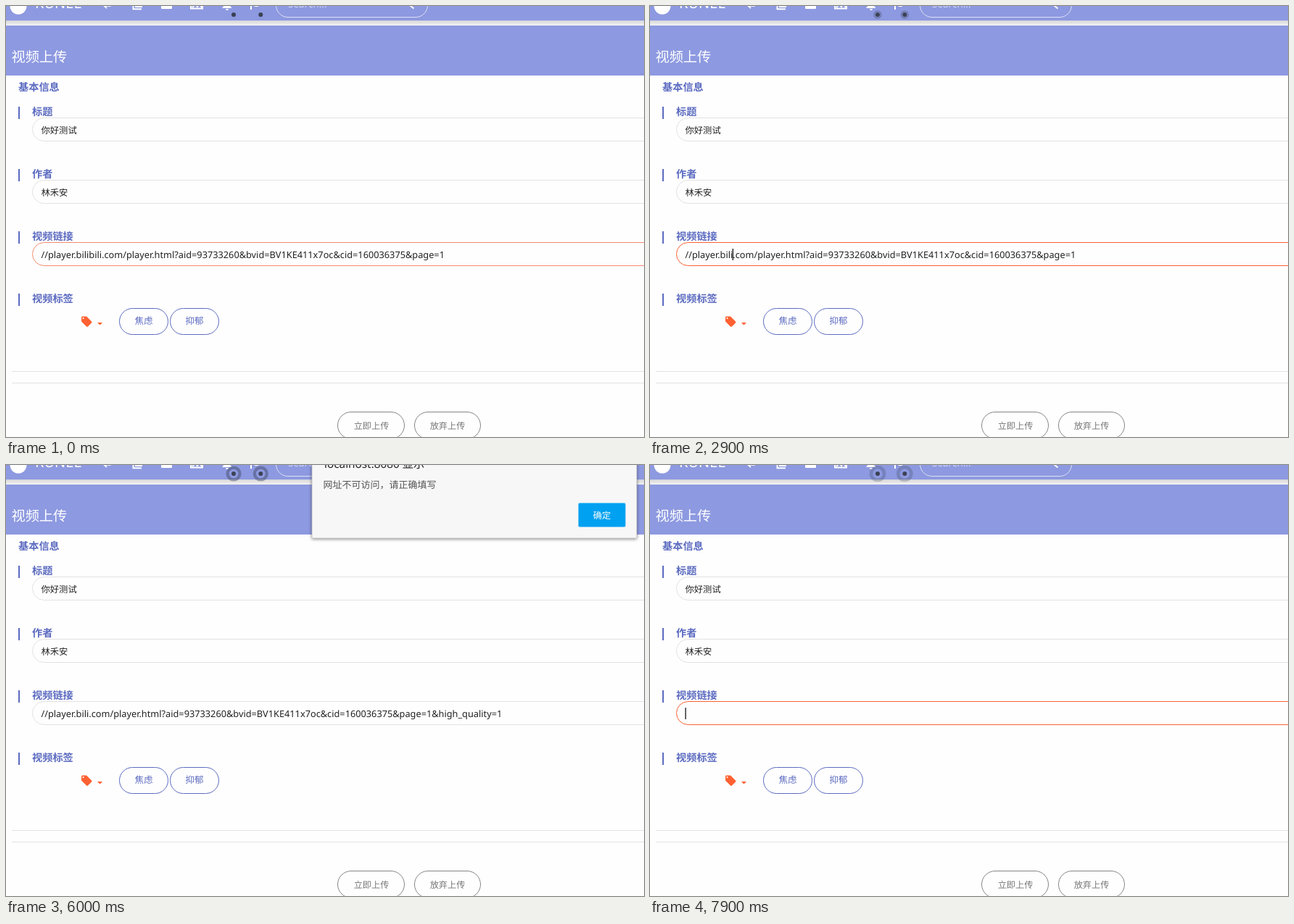
Recreate the animation shown at these times as an HTML page. Size 880 px wide and 595 px high, loop 8 s.

```html
<!DOCTYPE html>
<html lang="zh-CN">
<head>
<meta charset="utf-8">
<title>视频上传</title>
<style>
html, body { margin: 0; width: 100%; height: 100%; overflow: hidden; background: #fefefe; }
svg { display: block; width: 880px; height: 595px; }
text { font-family: "Noto Sans", "Noto Sans CJK SC", "Noto Sans CJK", sans-serif; text-rendering: geometricPrecision; white-space: pre; }
.mid { text-anchor: middle; }
.label { font-size: 14.2px; font-weight: 700; fill: #5c6bc0; }
.value { font-size: 12.3px; fill: #222; }
.pill { fill: none; stroke: #5c6bc0; }
.field { fill: none; stroke: #e2e2e2; }
.btn { fill: none; stroke: #868686; }
</style>
</head>
<body>
<svg viewBox="0 0 880 595">
  <defs>
    <linearGradient id="fall" x1="0" y1="0" x2="0" y2="1">
      <stop offset="0" stop-color="#d6d6d9"/><stop offset="1" stop-color="#f2f2f2"/>
    </linearGradient>
    <filter id="soft" x="-5%" y="-10%" width="110%" height="125%">
      <feDropShadow dx="0" dy="1" stdDeviation="2" flood-color="#000" flood-opacity=".5"/>
    </filter>
  </defs>
  <rect width="880" height="595" fill="#fefefe"/>

  <!-- top bar -->
  <rect width="880" height="20" fill="#8d99e0"/>
  <rect y="20" width="880" height="7" fill="url(#fall)"/>
  <circle cx="17" cy="0" r="11.5" fill="#fff"/>
  <text x="40" y="3" font-size="20" fill="#fff">RUNEL</text>
  <g fill="none" stroke="#fff" stroke-width="2">
    <path d="M144 -3V0H136M139 -3L135.500 0L139 3" stroke-width="1.700"/>
    <path d="M175.500 -6V4.300H187M179 -8H187V1H179Z"/>
    <path d="M255 -8H271V3.500H255ZM257 2L261 -2L264 1L267 -3L270 2"/>
  </g>
  <g fill="#fff">
    <rect x="214" y="-8" width="15" height="12" rx="1"/>
    <path d="M298.500 3V2L300.500 0V-8H309V0L311 2V3ZM303 4H307A2 2 0 0 1 303 4Z"/>
    <path d="M337 -9H348V1H343L342 -1H339V5H337Z"/>
  </g>
  <rect x="372.500" y="-18" width="209" height="33.500" rx="16.500" fill="none" stroke="#dde1f6"/>
  <text x="389" y="2" font-size="13.500" fill="#d3d8f4">Search...</text>
  <path d="M557 -1L562.500 3.500" stroke="#fff" stroke-width="2"/>
  <g id="dots"></g>

  <!-- page heading -->
  <rect y="27" width="880" height="69" fill="#8d99e0"/>
  <text x="7.500" y="77.300" font-size="19.200" fill="#fff">视频上传</text>
  <text class="label" x="17" y="117.300">基本信息</text>

  <g id="form"></g>
  <text class="value" x="48.500" y="176">你好测试</text>
  <text class="value" x="48.500" y="262">林禾安</text>
  <text id="url" x="48.500" y="347.800" font-size="12.760" fill="#222"></text>
  <rect id="caret" y="335" width="1.200" height="16" fill="#000"/>

  <!-- tags -->
  <path transform="translate(102.600 427.100) scale(.72)" fill="#ff6132" fill-rule="evenodd"
    d="M21.400 11.600L12.400 2.600C12 2.200 11.500 2 11 2H4C2.900 2 2 2.900 2 4V11C2 11.500 2.200 12 2.600 12.400L11.600 21.400C12.400 22.200 13.600 22.200 14.400 21.400L21.400 14.400C22.200 13.600 22.200 12.400 21.400 11.600ZM5.500 7A1.500 1.500 0 1 1 5.500 4A1.500 1.500 0 1 1 5.500 7Z"/>
  <path d="M126 437H133L129.500 440.500Z" fill="#ff6132"/>
  <rect class="pill" x="156.500" y="417.500" width="67" height="36" rx="18"/>
  <rect class="pill" x="226.500" y="417.500" width="67" height="36" rx="18"/>
  <g class="mid" font-size="12.500" fill="#5c6bc0">
    <text x="190" y="439.300">焦虑</text>
    <text x="260" y="439.300">抑郁</text>
  </g>

  <path d="M8 504.500H880M8 520.500H880" stroke="#e3e3e3"/>
  <rect class="btn" x="457.500" y="560.500" width="92" height="37" rx="18.500"/>
  <rect class="btn" x="563.500" y="560.500" width="91" height="37" rx="18.500"/>
  <g class="mid" font-size="12.200" fill="#777">
    <text x="504" y="584.200">立即上传</text>
    <text x="609" y="584.200">放弃上传</text>
  </g>

  <!-- alert -->
  <g id="alert">
    <rect x="422" y="-40" width="448" height="141" rx="1.500" fill="#f7f7f7" stroke="#a6a6a6" stroke-width=".6" filter="url(#soft)"/>
    <text x="439" y="4" font-size="15.300" fill="#222">localhost:8080 显示</text>
    <text x="437.500" y="32" font-size="13" fill="#555">网址不可访问，请正确填写</text>
    <rect x="789.500" y="52.500" width="65" height="33" rx="2" fill="#00a1f1" stroke="#7fcdf6"/>
    <text class="mid" x="822" y="74" font-size="12.300" fill="#fff">确定</text>
  </g>
</svg>
<script>
const NS = 'http://www.w3.org/2000/svg';
const LOOP = 8000, STEP = 100, BEAT = 925;
const $ = id => document.getElementById(id);
const clamp = v => Math.max(0, Math.min(1, v));
const ramp = (t, from, len) => clamp((t - from) / len);
const easeOut = p => 1 - Math.pow(1 - p, 1.75);

function add(parent, tag, attrs, text) {
  const el = document.createElementNS(NS, tag);
  for (const k in attrs) el.setAttribute(k, attrs[k]);
  if (text) el.textContent = text;
  parent.appendChild(el);
  return el;
}

// form rows, 86px apart
let linkBox;
['标题', '作者', '视频链接', '视频标签'].forEach((name, i) => {
  const y = 86 * i;
  add($('form'), 'rect', { x: 17, y: 139 + y, width: 2, height: 17, fill: '#5c6bc0' });
  add($('form'), 'text', { class: 'label', x: 36, y: 151.3 + y }, name);
  if (i < 3) linkBox = add($('form'), 'rect', { class: 'field', x: 36.5, y: 154.5 + y, width: 900, height: 32, rx: 16 });
});

// notification dots with a spreading ring
const rings = [314, 351.3].map(x => {
  add($('dots'), 'circle', { cx: x, cy: 12, r: 3, fill: '#3b4254' });
  return add($('dots'), 'circle', { cx: x, cy: 12, fill: 'none', stroke: '#2f3648' });
});

function pulse(t) {
  const size = [0, .1, .5, .8, 1], fade = [0, .1, .3, .5, 0];
  const p = ((t - 650) / BEAT + 2) % 1 * 4;
  const i = Math.floor(p), e = easeOut(p - i);
  const at = a => a[i] + (a[i + 1] - a[i]) * e;
  for (const ring of rings) {
    ring.setAttribute('r', 10 * at(size));
    ring.setAttribute('stroke-width', 5 * at(size));
    ring.setAttribute('opacity', at(fade));
  }
}

const HEAD = '//player.', REST = '.com/player.html?aid=93733260&bvid=BV1KE411x7oc&cid=160036375&page=1';
const SITE = 'bilibili', TAIL = '&high_quality=1';
const ERASE = [2300, 2400, 2500, 2900];
const PASTE = 3300, BLUR = 3600, CLEAR = 6900, REFOCUS = 7400;

function link(t) {
  const gone = ERASE.filter(k => t >= k).length;
  const start = HEAD + SITE.slice(0, SITE.length - gone);
  const full = t >= CLEAR ? '' : start + REST + (t >= PASTE ? TAIL : '');
  const url = $('url');
  if (url.textContent !== full) url.textContent = full;

  const typing = (t >= 1500 && t < 1900) || (t >= 2300 && t < BLUR) || t >= REFOCUS;
  const n = t >= 3100 ? full.length : start.length;
  const x = 48.5 + (n ? url.getSubStringLength(0, n) : 0);
  $('caret').setAttribute('x', n ? x - .6 : x);
  $('caret').setAttribute('visibility', typing ? 'visible' : 'hidden');

  const focus = 1 - ramp(t, -100, 300)
    + ramp(t, 1400, 300) - ramp(t, BLUR, 300)
    + ramp(t, REFOCUS - 100, 300);
  const mix = (a, b) => Math.round(a + (b - a) * focus);
  linkBox.style.stroke = `rgb(${mix(226, 252)},${mix(226, 96)},${mix(226, 50)})`;
}

function dialog(t) {
  const show = easeOut(ramp(t, 5450, 250)), hide = ramp(t, 6600, 250);
  const alpha = show * (1 - .9 * hide * hide);
  const dy = -12 * (1 - show) - 22 * hide, k = 1 + .01 * hide;
  const on = show > 0 && hide < 1;
  $('alert').setAttribute('visibility', on ? 'visible' : 'hidden');
  $('alert').setAttribute('opacity', alpha);
  $('alert').setAttribute('transform', `translate(646 ${dy}) scale(${k}) translate(-646 0)`);
}

function draw(ms) {
  const t = Math.floor(ms % LOOP / STEP) * STEP;
  pulse(t);
  link(t);
  dialog(t);
}

const begin = performance.now();
function tick() {
  draw(performance.now() - begin);
  requestAnimationFrame(tick);
}
tick();
</script>
</body>
</html>
```
